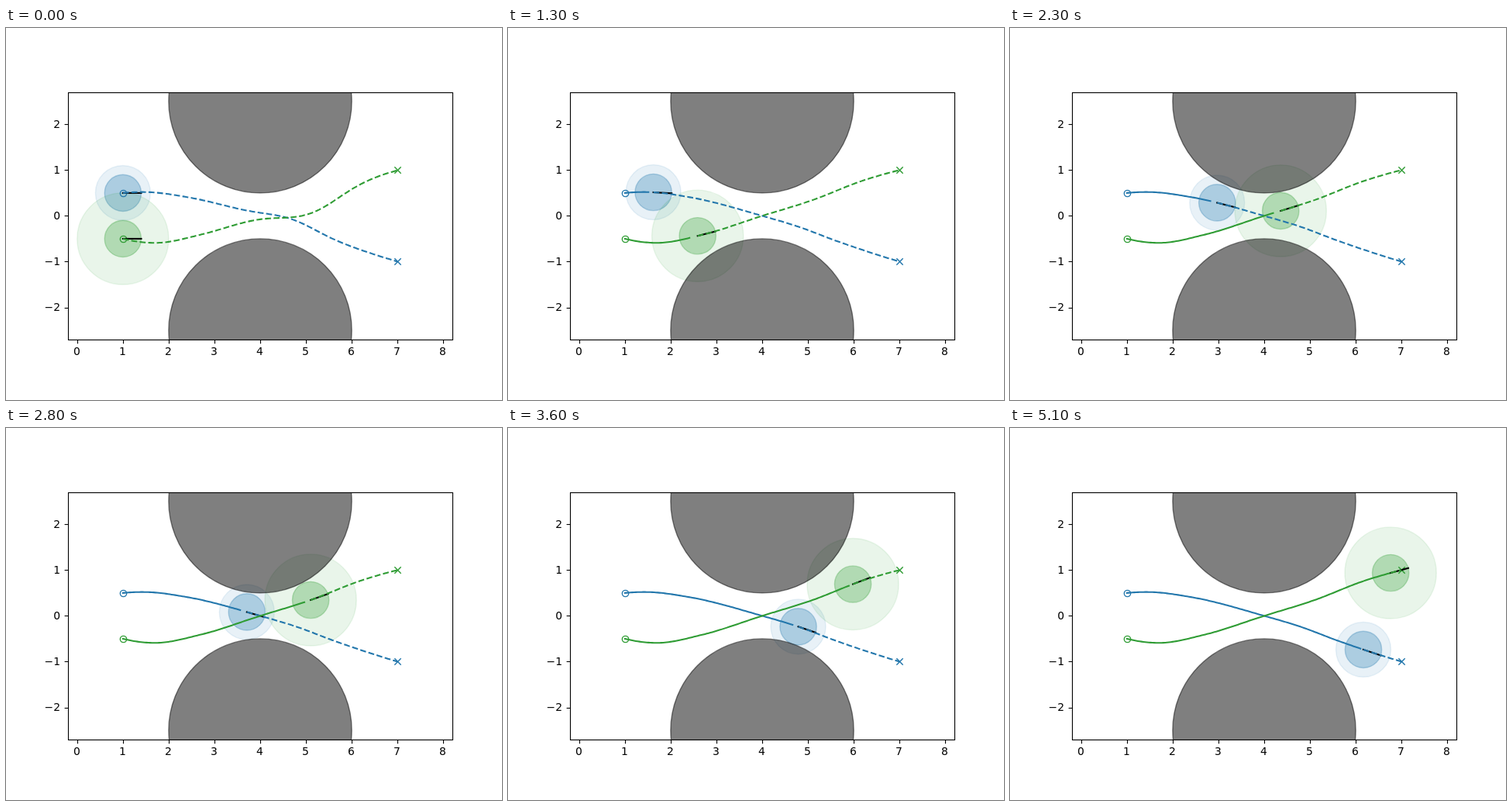
These frames come from a looping animation (640 px wide and 480 px high, 5200 ms). An HTML page:

```html
<!DOCTYPE html>
<html lang="en">
<head>
<meta charset="utf-8">
<title>Two robots crossing a gap</title>
<style>
  html, body { margin: 0; width: 100%; height: 100%; overflow: hidden; background: #fff; }
  svg { display: block; width: 640px; height: 480px; }
  text { font: 13.89px "DejaVu Sans", sans-serif; }
  .line { fill: none; stroke-width: 2.08; stroke-linecap: square; }
  .plan { stroke-dasharray: 7.7 3.33; stroke-linecap: butt; }
  .mark { fill: none; stroke-width: 1.39; }
  .frame { fill: none; stroke: #000; stroke-width: 1.11; }
</style>
</head>
<body>
<svg viewBox="0 0 640 480">
  <clipPath id="plot"><rect x="80" y="83" width="496" height="319"/></clipPath>
  <g id="discs" clip-path="url(#plot)"></g>
  <g id="lines" clip-path="url(#plot)"></g>
  <g id="axes"></g>
</svg>
<script>
const STEP = 100, STEPS = 52, UNIT = 59.05, START = 1, GOAL = 7, BODY = .4;
const px = x => 91.81 + UNIT * x;
const py = y => 242.4 - UNIT * y;
const snap = v => Math.round(v) + .5;
const [discs, lines, axes] = ["discs", "lines", "axes"].map(id => document.getElementById(id));

function set(el, attrs) {
  for (const k in attrs) el.setAttribute(k, attrs[k]);
}
function add(parent, tag, attrs, text) {
  const el = document.createElementNS("http://www.w3.org/2000/svg", tag);
  set(el, attrs);
  if (text !== undefined) el.textContent = text;
  return parent.appendChild(el);
}

// Smooth cubic through a few [x, y] points.
function spline(pts) {
  const last = pts.length - 1;
  const sec = i => (pts[i + 1][1] - pts[i][1]) / (pts[i + 1][0] - pts[i][0]);
  const m = pts.map((p, i) => {
    if (i === 0 || i === last) return 0;
    const a = p[0] - pts[i - 1][0], b = pts[i + 1][0] - p[0];
    return (b * sec(i - 1) + a * sec(i)) / (a + b);
  });
  m[0] = 2 * sec(0) - m[1];
  m[last] = 2 * sec(last - 1) - m[last - 1];
  return x => {
    let i = 0;
    while (i < last - 1 && x > pts[i + 1][0]) i++;
    const [x0, y0] = pts[i], [x1, y1] = pts[i + 1];
    const h = x1 - x0, u = (x - x0) / h, v = 1 - u;
    return v * v * (1 + 2 * u) * y0 + u * u * (1 + 2 * v) * y1
         + h * u * v * (v * m[i] - u * m[i + 1]);
  };
}

function trace(f, from, to) {
  const count = Math.ceil((to - from) * 25), pts = [];
  for (let i = 0; i <= count; i++) {
    const x = from + (to - from) * i / (count || 1);
    pts.push(`${px(x)},${py(f(x))}`);
  }
  return "M" + pts.join("L");
}

// drive: delay, time scale and power of the approach to the goal
// bulge: height, centre and width of the first plan's detour
const robots = [
  {
    color: "#2377ac", reach: .6,
    path: spline([[1, .5], [1.5, .52], [2.4, .41], [4, 0], [4.8, -.24], [5.6, -.54], [7, -1]]),
    drive: [.347, 3.257, 1.8], bulge: [.13, 4.65, .8]
  },
  {
    color: "#2f9c34", reach: 1,
    path: spline([[1, -.5], [1.7, -.59], [2.7, -.41], [4, 0], [5.1, .345], [6.2, .77], [7, 1]]),
    drive: [0, 2.58, 1.72], bulge: [-.29, 5.1, .95]
  }
];

function position([delay, scale, power], n) {
  const t = Math.max(0, n * STEP / 1000 - delay);
  return GOAL - (GOAL - START) * Math.exp(-((t / scale) ** power));
}

function disc(color, r, alpha) {
  return add(discs, "circle", {
    r: r * UNIT, fill: color, stroke: color, "stroke-width": 1.39,
    "fill-opacity": alpha, "stroke-opacity": alpha
  });
}

for (const r of robots) {
  const ink = { stroke: r.color }, s = 4.17;
  const at = x => [snap(px(x)), snap(py(r.path(x)))];
  const [cx, cy] = at(START), [gx, gy] = at(GOAL);
  r.discs = [disc(r.color, r.reach, .1), disc(r.color, BODY, .3)];
  r.trail = add(lines, "path", { class: "line", ...ink });
  add(lines, "circle", { class: "mark", ...ink, cx, cy, r: s });
  add(lines, "path", {
    class: "mark", ...ink,
    d: `M${gx - s},${gy - s}l${2 * s},${2 * s}m${-2 * s},0l${2 * s},${-2 * s}`
  });
  r.nose = add(lines, "path", { class: "line", stroke: "#000" });
  r.plan = add(lines, "path", { class: "line plan", ...ink });
}
for (const y of [2.5, -2.5]) set(disc("#000", 2, .5), { cx: px(4), cy: py(y) });

add(axes, "rect", { class: "frame", x: 80.5, y: 83.5, width: 496, height: 319 });
for (let i = 0; i <= 8; i++) {
  add(axes, "path", { class: "frame", d: `M${snap(px(i))},402.5v4.9` });
  add(axes, "text", { x: Math.floor(px(i) - 4.42), y: 422 }, i);
}
for (let i = -2; i <= 2; i++) {
  add(axes, "path", { class: "frame", d: `M80.5,${snap(py(i))}h-4.9` });
  add(axes, "text", { x: 70, y: Math.floor(py(i) + 5), "text-anchor": "end" },
    String(i).replace("-", "\u2212"));
}

function draw(n) {
  const fade = Math.exp(-.7 * n);
  for (const { path, drive, bulge: [height, mid, width], ...r } of robots) {
    const x = position(drive, n), cx = px(x), cy = py(path(x));
    const slope = n ? (path(x + .01) - path(x - .01)) / .02 : 0;
    const len = BODY * UNIT / Math.hypot(1, slope);
    const plan = q => path(q) + fade * height * Math.exp(-(((q - mid) / width) ** 2));
    for (const c of r.discs) set(c, { cx, cy });
    set(r.trail, { d: n ? trace(path, START, position(drive, n - 1)) : "" });
    set(r.nose, { d: `M${cx},${cy}l${len},${-len * slope}` });
    set(r.plan, { d: trace(plan, x, GOAL) });
  }
}

let shown = -1;
function tick(now) {
  const n = Math.floor(now / STEP) % STEPS;
  if (n !== shown) draw(shown = n);
  requestAnimationFrame(tick);
}
draw(0);
requestAnimationFrame(tick);
</script>
</body>
</html>
```
